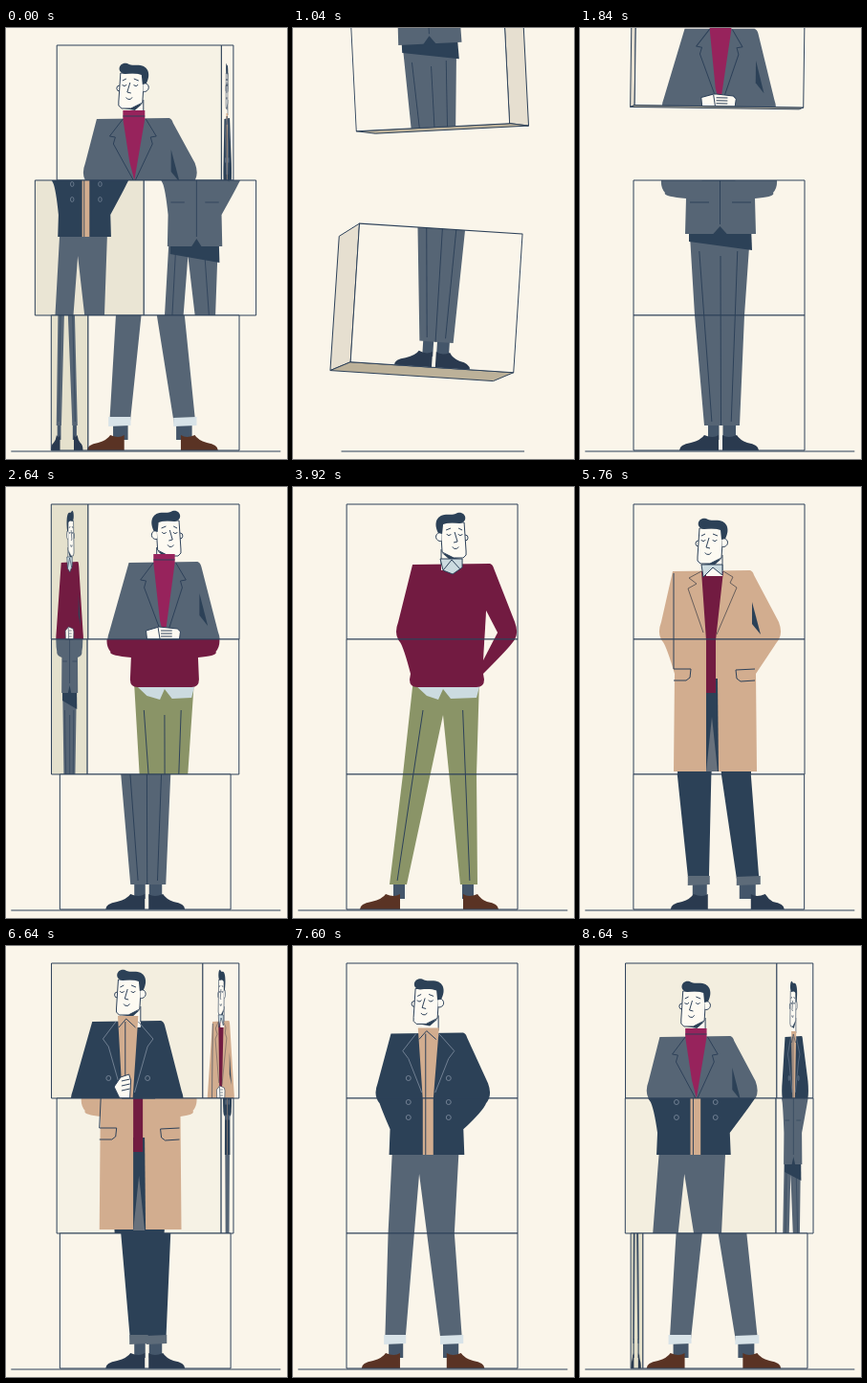
Recreate the animation shown at these times as an HTML page with a canvas. Size 294 by 450 pixels, loop 8.72 s.

```html
<!DOCTYPE html>
<html lang="en">
<head>
<meta charset="utf-8">
<title>Outfit boxes</title>
<style>
html, body { margin: 0; width: 100%; height: 100%; overflow: hidden; background: #faf5ea; }
canvas { display: block; }
</style>
</head>
<body>
<canvas id="stage" width="294" height="450"></canvas>
<script>
const g = document.getElementById('stage').getContext('2d');
const LOOP = 8720, L = 56, R = 235, W = R - L, ROW = 141, TOP = 18, MID = 145.5;
const BG = '#faf5ea', INK = '#2d4159', NAVY = '#2c4157', GREY = '#566575', WINE = '#721b41',
  TAN = '#d2ad8f', BLUE = '#ccdbe0', BROWN = '#5a3324', SKIN = '#fdfaf2', SIDE = '#e6dfd0', SHADE = '#e3dfca';

// head x, y | shoulders, y | elbows | hem | thighs | crotch | left ankle | right ankle | shoes
const relaxed = [139, 4, 101, 180, 95, 86, 207, 98, 178, 94, 168, 128, 87, 109, 157, 180, 63, 103, 164, 204];
const right = [166, -6, 125, 209, 81, 107, 235, 122, 200, 115, 192, 157, 101, 119, 175, 193, 70, 112, 178, 215];
const left = [138, 0, 97, 181, 88, 82, 211, 98, 185, 102, 179, 139, 114, 135, 165, 188, 95, 134, 179, 214];
const formal = [149, -8, 108, 185, 79, 84, 207, 110, 184, 120, 172, 147, 130, 147.5, 147.5, 167, 104, 145, 149, 187];

const outfits = [
  { kind: 'suit', top: GREY, legs: GREY, shoe: '#2a3a4f', hem: [228, 215], stance: relaxed },
  { kind: 'sweater', top: WINE, legs: '#8a9467', shoe: BROWN, hem: [209, 209], stance: right },
  { kind: 'coat', top: TAN, legs: NAVY, shoe: '#2a3a4f', cuff: '#5d6b79', hem: [297, 296], stance: left },
  { kind: 'pea', top: NAVY, legs: GREY, shoe: BROWN, cuff: '#d8e3e8', hem: [218, 218], stance: relaxed }
];
// midpoints of each row's turns
const turns = [[2720, 4400, 6560, 8560], [2560, 4880, 6800, 8720], [3040, 5360, 7040, 8800]];
const turnDir = [1, -1, 1];
const flights = [
  { start: 600, end: 1920, x: 4, y: -345, tilt: 3.5, squeeze: .06, dx: -20, dy: 8 },
  { start: 640, end: 1800, x: -3, y: -219, tilt: -3.2, squeeze: .114, dx: 22, dy: 2.7 },
  { start: 680, end: 1680, x: 5, y: -96, tilt: 4, squeeze: .049, dx: -23, dy: 9.6 }
];

const clamp = x => Math.max(0, Math.min(1, x));
const mix = (a, b, k) => a + (b - a) * k;
const smooth = x => { x = clamp(x); return x * x * (3 - 2 * x); };
const expo = u => u <= 0 ? 0 : u >= 1 ? 1 : u < .5 ? 2 ** (20 * u - 11) : 1 - 2 ** (9 - 20 * u);

function trace(p) {
  g.beginPath();
  for (let i = 0; i < p.length; i += 2) g.lineTo(p[i], p[i + 1]);
}
function fill(color, ...p) { trace(p); g.fillStyle = color; g.fill(); }
function line(color, ...p) { trace(p); g.strokeStyle = color; g.stroke(); }
function panel(color, ...p) {
  fill(color, ...p);
  g.closePath();
  g.strokeStyle = INK;
  g.stroke();
}

// 0 = hands in pockets, 1 = hands clasped
function poseOf(o, t) {
  if (o == 0) return smooth(((t > 8000 ? t - LOOP : t) - 400) / 500);
  if (o == 1) return 1 - smooth((t - 3350) / 450);
  if (o == 2) return smooth((t - 5800) / 500);
  return 1 - smooth((t - 7250) / 500);
}

function shoe(color, toe, heel) {
  const d = Math.sign(heel - toe);
  g.beginPath();
  g.moveTo(toe, 441);
  g.quadraticCurveTo(toe, 435, toe + 12 * d, 433);
  g.quadraticCurveTo(heel - 18 * d, 430, heel - 15 * d, 425);
  g.quadraticCurveTo(heel - 6 * d, 429, heel, 425);
  g.lineTo(heel, 441);
  g.fillStyle = color;
  g.fill();
}

function ear(x, y, r, from, to) {
  g.beginPath();
  g.arc(x, y, r, from, to);
  g.fillStyle = SKIN;
  g.fill();
  g.strokeStyle = INK;
  g.stroke();
}

function head(x, y, flip) {
  g.save();
  g.translate(x, y);
  if (flip) g.scale(-1, 1);
  fill(SKIN, -6, 40, 11, 36, 11, 60, -6, 60);
  line(INK, 11, 38, 11, 54);
  fill(NAVY, -9, 47, 10, 42, 2, 49);
  ear(-14, 26, 3, 1.5, 4.8);
  panel(SKIN, -13, 10, -15, 40, -15, 44, -12, 47, -2, 47, 10, 41, 12, 10);
  ear(12, 25, 4.5, -1.8, 1.9);
  g.beginPath();
  g.moveTo(-8, 11);
  g.bezierCurveTo(-18, 10, -15, -2, -6, 0);
  g.bezierCurveTo(0, 3, 2, 1, 8, 2);
  g.bezierCurveTo(18, 4, 18, 14, 14, 21);
  g.lineTo(10, 22);
  g.lineTo(9, 12);
  g.quadraticCurveTo(2, 9, -8, 11);
  g.fillStyle = NAVY;
  g.fill();
  for (const [ex, ey, r] of [[-9, 21, 2.5], [3, 21, 2.5], [-4, 34, 3.5]]) {
    g.beginPath();
    g.arc(ex, ey, r, .4, 2.7);
    g.stroke();
  }
  line(INK, -3, 20, -6, 30, -2, 31);
  line(INK, -11, 18, -7, 16);
  line(INK, 1, 16, 6, 18);
  g.restore();
}

function figure(o, t) {
  const { kind, top, legs, shoe: leather, cuff, hem: hems, stance } = outfits[o];
  const p = poseOf(o, t), hem = mix(...hems, p);
  const [hx, hy, s0, s1, sy, e0, e1, h0, h1, k0, k1, cx, l0, l1, r0, r1, f0, f1, f2, f3] =
    stance.map((v, i) => mix(v, formal[i], p));
  const n = (s0 + s1) / 2, flare = kind == 'coat' ? 6 * p : 0;
  const b0 = h0 - flare, b1 = h1 + flare;

  // legs
  fill('#44566a', l0 + 4, 410, l1 - 2, 410, l1 - 2, 430, l0 + 4, 430);
  fill('#44566a', r0 + 2, 410, r1 - 4, 410, r1 - 4, 430, r0 + 2, 430);
  shoe(leather, f0, f1);
  shoe(leather, f3, f2);
  fill(legs, h0 + 4, 200, h1 - 5, 200, k1, 300, r1, 415, r0, 415, cx, 238, l1, 415, l0, 415, k0, 300);
  if (cuff) {
    fill(cuff, l0 - 1, 406, l1 + 1, 406, l1 + 1, 415, l0 - 1, 416);
    fill(cuff, r0 - 1, 407, r1 + 1, 406, r1 + 1, 415, r0 - 1, 416);
  } else {
    line(INK, mix(h0, cx, .4), 233, mix(l0, l1, .45), 411);
    line(INK, mix(h1, cx, .52), 233, mix(r0, r1, .55), 411);
    if (p > .9) line(INK, cx, 238, l1, 415);
  }
  if (kind == 'suit') fill(NAVY, b0 + 4, hem - 8, b1 - 5, hem - 8, b1 - 4, hem + 17, b0 + 4, hem + 8);
  if (kind == 'sweater')
    fill(BLUE, b0 + 4, 205, b1 - 4, 205, b1 - 8, 220, cx + 8, 221, cx, 211, cx - 5, 222, b0 + 18, 218);

  // torso and arms
  const ey = mix(151, 161, p), wy = mix(195, 178, p);
  g.beginPath();
  g.moveTo(s0, sy);
  g.lineTo(s1 - 3, sy - 1);
  g.quadraticCurveTo(s1, sy, s1 + 1, sy + 4);
  g.lineTo(e1 - 3, ey - 10);
  g.quadraticCurveTo(e1 + 2, ey + 3, e1 - 5, ey + 11);
  g.quadraticCurveTo(mix(e1 - 9, e1 - 2, p), mix(ey + 17, 176, p), b1 - 1, wy);
  if (kind == 'sweater') {
    g.lineTo(b1, hem - 8);
    g.quadraticCurveTo(b1, hem, b1 - 8, hem);
    g.lineTo(b0 + 8, hem);
    g.quadraticCurveTo(b0, hem, b0, hem - 8);
  } else {
    g.lineTo(b1, hem);
    g.lineTo(b0, hem);
  }
  g.lineTo(b0 + 1, wy);
  g.quadraticCurveTo(mix(e0 + 9, e0 + 2, p), mix(ey + 17, 176, p), e0 + 5, ey + 11);
  g.quadraticCurveTo(e0 - 2, ey + 3, e0 + 3, ey - 10);
  g.closePath();
  g.fillStyle = top;
  g.fill();
  if (kind == 'sweater' && p < .5)
    fill(BG, s1 - 7, sy + 48, s1 + 5, sy + 71, s1 - 10, sy + 100);
  else if (kind != 'pea')
    fill(NAVY, s1 - 1, sy + 32, s1 + 8, sy + 66, s1 - 1, sy + 55);

  // front of the garment
  const neckAndHead = () => head(hx, 33 + hy, o == 1 || (o == 0 && p > .5));
  if (kind == 'suit') {
    neckAndHead();
    fill('#97235c', n - 12, sy - 9, n + 11, sy - 9, n + 11, sy, n, 159, n - 5, 140, n - 12, sy);
    line(INK, n - 12, sy - 3, n + 11, sy - 3);
    line(INK, n - 12, sy, n - 26, sy + 18, n - 20, sy + 19, n - 22, sy + 26, n - 1, 159);
    line(INK, n + 12, sy, n + 23, sy + 18, n + 17, sy + 19, n + 19, sy + 26, n + 1, 159);
    line(INK, n, 159, n, hem - 10);
    fill(NAVY, n, hem - 8, n + 8, hem + 1, n - 8, hem + 1);
    line(INK, b0 + 5, 182, b0 + 25, 182);
    line(INK, b1 - 25, 182, b1 - 5, 182);
  } else if (kind == 'sweater') {
    neckAndHead();
    panel(BLUE, n - 13, sy - 6, n + 10, sy - 6, n + 10, sy + 3, n, sy + 10, n - 10, sy + 6);
    line(INK, n - 10, sy + 6, n - 1, sy - 5, n + 8, sy + 5);
  } else if (kind == 'coat') {
    fill(NAVY, n - 7, 200, n + 5, 200, n + 6, 297, n - 7, 297);
    fill('#68717c', n - 1, 240, n + 5, 297, n - 7, 297);
    fill(WINE, n - 12, sy, n + 11, sy, n + 3, 160, n + 3, 215, n - 7, 215, n - 7, 160);
    neckAndHead();
    panel(BLUE, n - 12, sy - 7, n + 10, sy - 7, n + 10, sy + 4, n, sy - 4, n - 10, sy + 6);
    line('#685e5b', n - 12, sy, n - 25, sy + 7, n - 17, sy + 13, n - 26, sy + 18, n - 10, sy + 64);
    line('#685e5b', n + 11, sy, n + 21, sy + 6, n + 18, sy + 12, n + 25, sy + 17, n + 4, sy + 66);
    line(INK, s0 + 1, sy + 2, b0, 190);
    line(INK, b0, 190, b0 + 18, 190, b0 + 17, 199, b0 + 13, 202, b0, 202);
    line(INK, b1 - 2, 190, b1 - 22, 191, b1 - 21, 200, b1 - 17, 203, b1 - 2, 202);
  } else {
    neckAndHead();
    fill(TAN, n - 11, sy - 6, n + 11, sy - 6, n + 5, 160, n + 5, 218, n - 6, 218, n - 6, 160);
    line(INK, n - 10, sy + 6, n - 2, sy - 3, n + 8, sy + 6);
    line(INK, n - 3, sy, n - 3, 218);
    line('#718093', n - 13, sy, n - 27, sy + 18, n - 21, sy + 26, n - 7, 153);
    line('#718093', n + 11, sy, n + 27, sy + 18, n + 21, sy + 26, n + 7, 153);
    for (const y of [138, 163, 179]) for (const x of [n - 21, n + 21]) {
      g.beginPath();
      g.arc(x, y, 2.5, 0, 7);
      g.stroke();
    }
  }
  if (p > .6) {
    if (kind == 'pea') {
      panel(SKIN, n - 8, 137, n + 1, 134, n + 3, 140, n + 2, 159, n - 9, 159, n - 15, 147);
      for (const y of [139, 144, 149]) line(INK, n - 7, y + 2, n + 2, y);
    } else {
      panel(SKIN, n - 20, 150, n - 6, 146, n + 14, 148, n + 17, 151, n + 16, 159, n - 19, 159);
      for (const y of [150, 153, 156]) line(INK, n - 4, y, n + 8, y);
      line(INK, n - 7, 147, n - 5, 159);
    }
  }
}

// the figure keeps its true foreshortening and may overlap the face's sides
function face(o, t, x0, x1, y, shade, squash) {
  if (x1 - x0 < 1) return;
  fill(BG, x0, y, x1, y, x1, y + ROW, x0, y + ROW);
  g.globalAlpha = shade;
  fill(SHADE, x0, y, x1, y, x1, y + ROW, x0, y + ROW);
  g.globalAlpha = 1;
  g.save();
  g.beginPath();
  g.rect(0, y, 294, ROW);
  g.clip();
  g.translate((x0 + x1) / 2, 0);
  g.scale(squash, 1);
  g.translate(-MID, 0);
  figure(o, t);
  g.restore();
  g.strokeStyle = INK;
  g.strokeRect(x0, y, x1 - x0, ROW);
}

function lift(row, t) {
  const { start, end } = flights[row], u = clamp((t - start) / (end - start));
  return 4 * u * (1 - u);
}

function box(row, t) {
  const y = TOP + row * ROW, h = lift(row, t);
  if (h > 0) {
    const f = flights[row], a = f.tilt * h * Math.PI / 180;
    const cx = MID + f.x * h, cy = y + ROW / 2 + f.y * h;
    const sx = 1 - f.squeeze * h, sy = 1 + .03 * h;
    const dx = f.dx * h, dy = f.dy * h;
    const corner = (i, j) => {
      const u = i * W / 2 * sx, v = j * ROW / 2 * sy;
      return [cx + u * Math.cos(a) - v * Math.sin(a), cy + u * Math.sin(a) + v * Math.cos(a)];
    };
    const back = ([px, py], k = 1) => [px + dx, py + dy * k];
    const s = Math.sign(dx), up = corner(s, -1), down = corner(s, 1), far = corner(-s, 1);
    panel(SIDE, ...up, ...back(up, 1.5), ...back(down), ...down);
    panel('#bcb199', ...down, ...back(down), ...back(far), ...far);
    g.save();
    g.translate(cx, cy);
    g.rotate(a);
    g.scale(sx, sy);
    g.translate(-MID, -y - ROW / 2);
    face(0, t, L, R, y, 0, 1);
    g.restore();
    return;
  }
  const clock = t < 600 ? t + LOOP : t;
  let k = turns[row].findIndex(c => clock < c + 500);
  let q = 0;
  if (k < 0) k = 0;
  else q = expo((clock - turns[row][k]) / 1000 + .5);
  const next = (k + 1) % 4, fromLeft = turnDir[row] > 0;
  const e = fromLeft ? q : 1 - q, bulge = 2 * Math.min(e, 1 - e);
  const x0 = L - 26 * bulge, edge = L + W * e, x1 = R + 27 * bulge;
  const wl = edge - x0, wr = x1 - edge, depth = Math.hypot(wl, wr);
  face(fromLeft ? next : k, clock, x0, edge, y, (1 - e) ** .6, wl / depth);
  face(fromLeft ? k : next, clock, edge, x1, y, 0, wr / depth);
}

function frame(now) {
  const t = now % LOOP;
  fill(BG, 0, 0, 294, 0, 294, 450, 0, 450);
  g.lineWidth = 1;
  g.lineJoin = 'round';
  const half = 141 - 49 * lift(2, t);
  line(INK, 146.3 - half, 442, 146.3 + half, 442);
  for (let row = 0; row < 3; row++) box(row, t);
}

const began = performance.now();
function tick() {
  frame(performance.now() - began);
  requestAnimationFrame(tick);
}
tick();
</script>
</body>
</html>
```
